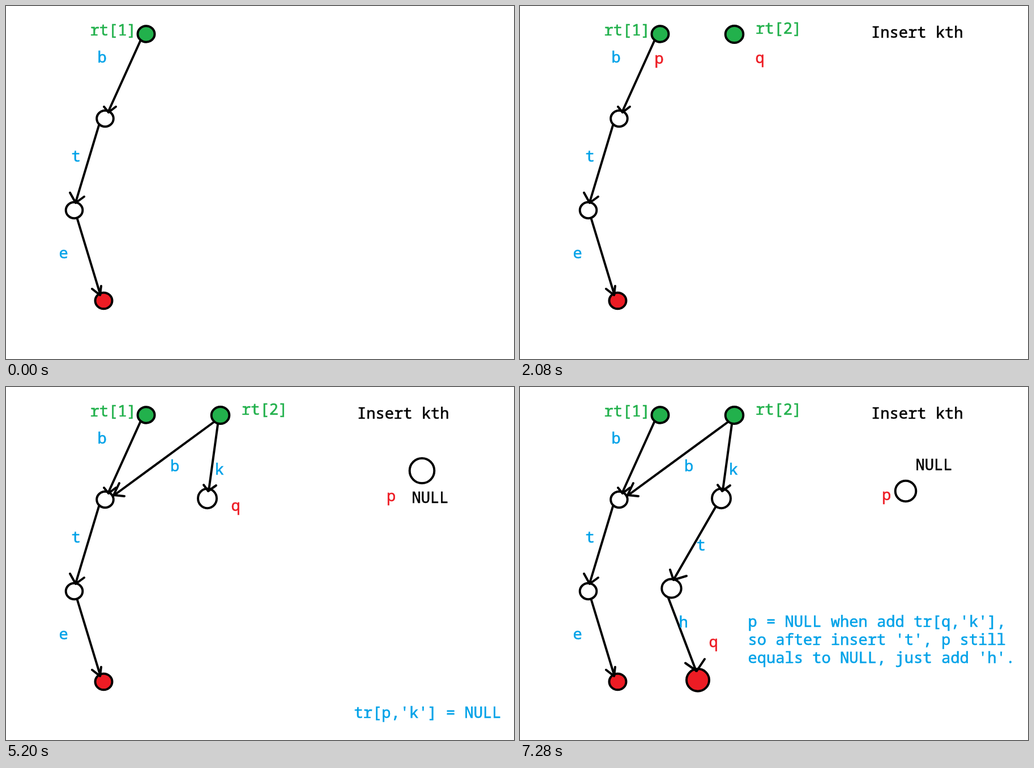
An HTML page for the animation above (8320 ms loop, 897x624 px).

```html
<!DOCTYPE html>
<html lang="en">
<head>
<meta charset="utf-8">
<title>Persistent trie insertion</title>
<style>
  html, body { margin: 0; width: 100%; height: 100%; overflow: hidden; background: #fff; }
  svg { display: block; width: 897px; height: 624px; }
  ellipse, path { stroke: #000; stroke-width: 4; stroke-linecap: round; stroke-linejoin: round; }
  path { fill: none; }
  text { font: 27.1px "Noto Sans Mono", "DejaVu Sans Mono", monospace; stroke-width: .6; }
</style>
</head>
<body>
<svg id="stage" viewBox="0 0 897 624"></svg>
<script>
const STEP = 1040, STEPS = 8;
const GREEN = '#22b14c', RED = '#ed1c24', BLUE = '#00a2e8', BLACK = '#000', WHITE = '#fff';
const stage = document.getElementById('stage');
const parts = [];

// Every part is visible from step `from` up to, but not including, step `to`.
function add(tag, attrs, from = 0, to = STEPS) {
  const el = document.createElementNS('http://www.w3.org/2000/svg', tag);
  for (const name in attrs) el.setAttribute(name, attrs[name]);
  stage.append(el);
  parts.push({ el, from, to });
  return el;
}

const node = (cx, cy, rx, ry, fill, from, to) =>
  add('ellipse', { cx, cy, rx, ry, fill }, from, to);

const arrow = (shaft, head, from) => add('path', { d: `M${shaft}M${head}` }, from);

// The thin stroke in the fill colour gives the letters a medium weight.
const label = (string, x, y, fill, from, to) => {
  add('text', { x, y, fill, stroke: fill }, from, to).textContent = string;
};

const paragraph = (lines, x, y, from, to) =>
  lines.forEach((line, i) => label(line, x, y + i * 31.8, BLUE, from, to));

// Nodes
node(247.5, 49.5, 15, 14.2, GREEN);
node(175, 199, 14.8, 14.2, WHITE);
node(120.5, 361, 14.8, 14.2, WHITE);
node(172.5, 521, 15, 14.3, RED);
node(378.5, 50, 15.8, 15, GREEN, 2);
node(355.5, 197, 16.5, 17.3, WHITE, 4);
node(267.5, 356, 17.2, 16.5, WHITE, 6);
node(314, 518, 20, 19.7, RED, 7);
node(734.5, 148, 21.8, 22, WHITE, 5, 6);
node(685.5, 136, 19, 18, WHITE, 6, 7);
node(681, 184, 18.3, 18.3, WHITE, 7);

// Edges
arrow('237.5 61L180.5 187', '173 178L181 188L194 178');
arrow('164 211L123 347', '113 330L123 348L138 337');
arrow('125.5 375L166.5 510', '152 500L166 511L168 495');
arrow('367 62L190 192', '200 170L190 191L209 193', 3);
arrow('374 66L358 183', '349 173L357 184L371 174', 4);
arrow('346 211L271 341', '265 323L271 341L294 334', 6);
arrow('262 373L311 502', '292 488L312 502L326 481', 7);

// Roots and edge letters
label('rt[1]', 148.5, 52, GREEN);
label('rt[2]', 416, 49, GREEN, 2);
label('b', 161.5, 100, BLUE);
label('t', 115.5, 275, BLUE);
label('e', 93.5, 446, BLUE);
label('b', 290, 149, BLUE, 3);
label('k', 368.5, 155, BLUE, 4);
label('t', 311.5, 289, BLUE, 6);
label('h', 280.5, 425, BLUE, 7);

// Pointers
label('p', 237.5, 102, RED, 2, 5);
label('q', 415.5, 101, RED, 2, 5);
label('p', 672, 202, RED, 5, 6);
label('q', 397.5, 219, RED, 5, 6);
label('p', 642, 174, RED, 6, 7);
label('q', 314.5, 351, RED, 6, 7);
label('p', 639, 200, RED, 7);
label('q', 333.5, 460, RED, 7);

// Notes
label('Insert kth', 620, 56, BLACK, 1);
label('NULL', 716.5, 205, BLACK, 5, 6);
label('NULL', 729.5, 117, BLACK, 6, 7);
label('NULL', 698.5, 147, BLACK, 7);
label("tr[p,'k'] = NULL", 614.5, 585, BLUE, 4, 7);
paragraph(['so just create a', "new node,let tr[p,'t']", 'equals to it.'], 381, 391, 6, 7);
paragraph(["p = NULL when add tr[q,'k'],", "so after insert 't', p still", "equals to NULL, just add 'h'."], 402.5, 424, 7);

function render() {
  const step = Math.floor(performance.now() / STEP) % STEPS;
  for (const { el, from, to } of parts)
    el.style.display = step >= from && step < to ? '' : 'none';
  requestAnimationFrame(render);
}
render();
</script>
</body>
</html>
```
